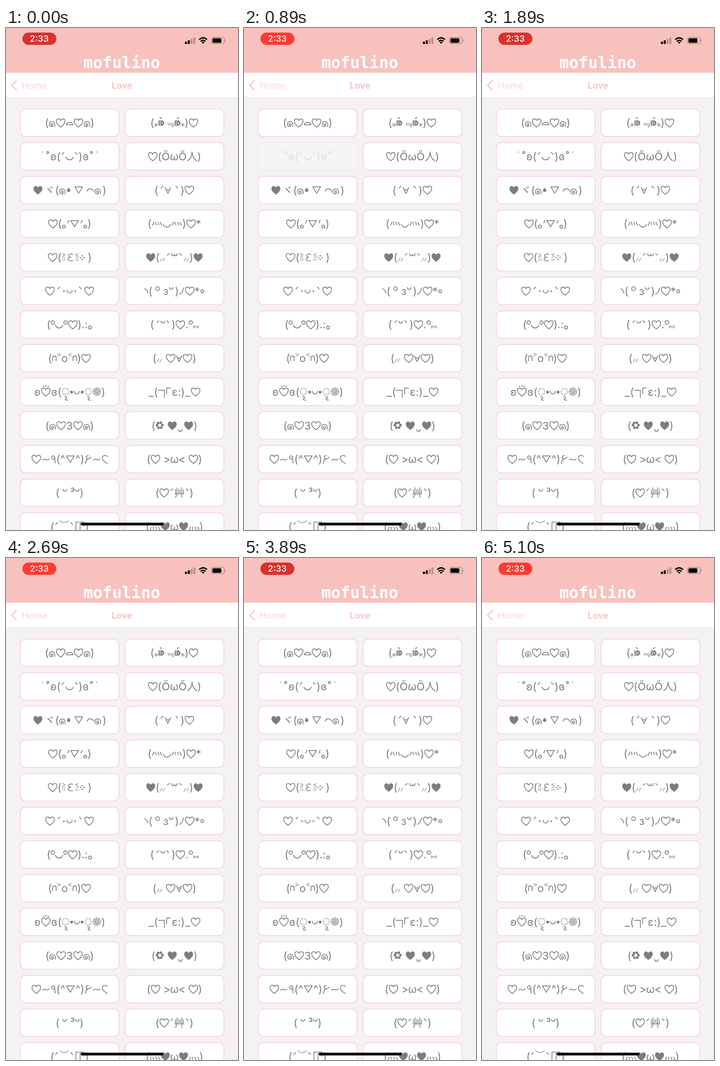
An HTML page for the animation above (5200 ms loop, 509 by 1100 pixels).

```html
<!DOCTYPE html>
<html lang="en">
<head>
<meta charset="utf-8">
<title>Love</title>
<style>
html, body { margin: 0; width: 100%; height: 100%; overflow: hidden; background: #f4f2f5; }
svg { display: block; }
text { font-family: Inter, "Open Sans", sans-serif; }
.mono { font: bold 35px "DejaVu Sans Mono", monospace; fill: #fff; }
.box { fill: #fff; stroke: #f9c4c7; stroke-width: 1.2; }
.face text { font: 23.5px Inter, "DejaVu Sans", "Noto Sans CJK JP", "Noto Sans CJK", sans-serif; fill: #7f7c80; }
.face path { fill: none; stroke: #7f7c80; stroke-width: 1.7; stroke-linecap: round; stroke-linejoin: round; }
.face path.solid { fill: #7f7c80; stroke-width: .6; }
.face path.cut { fill-rule: evenodd; stroke-width: .2; }
.face path.thin { stroke-width: 1.1; }
.face path.petals { stroke-width: 5.8; stroke-dasharray: 0 6.283; }
.face path.ring { stroke-width: 2.1; stroke-dasharray: 0 3.66; }
.note { font: 24.4px "Liberation Sans", sans-serif; fill: #fdc0ca; visibility: hidden; }
.pill { animation: pulse 5.2s ease-in-out infinite; }
.tap { animation: press 5.2s linear infinite; }
.tap .face { animation: hide 5.2s step-end infinite; }
.tap .note { animation: show 5.2s step-end infinite; }
.tap, .tap .face, .tap .note { animation-delay: var(--delay); }
@keyframes pulse {
  0%, 36.4%, 38%, 75%, 76.5% { fill: #da312c; }
  13.5%, 24%, 50%, 63.5%, 91.3%, 100% { fill: #ff3b30; }
}
@keyframes press {
  0%, 9.6%, 100% { opacity: 1; }
  2.9%, 4.8% { opacity: .17; }
}
@keyframes hide {
  0%, 17.3% { visibility: visible; }
  4.8% { visibility: hidden; }
}
@keyframes show {
  0%, 17.3% { visibility: hidden; }
  4.8% { visibility: visible; }
}
</style>
</head>
<body>
<svg width="509" height="1100" viewBox="0 0 509 1100">
  <rect width="509" height="1100" fill="#f4f2f5"/>
  <rect width="509" height="98" fill="#f9c1be"/>
  <rect class="pill" x="36" y="10" width="74.500" height="27" rx="13.500"/>
  <text x="73" y="30" font-size="19" font-weight="500" fill="#fff" text-anchor="middle">2:33</text>
  <g>
    <rect x="392.500" y="30" width="4.500" height="5" rx="1"/>
    <rect x="398.700" y="27" width="4.500" height="8" rx="1"/>
    <rect x="405" y="24" width="4.500" height="11" rx="1" opacity=".25"/>
    <rect x="411" y="20.500" width="4.500" height="14.500" rx="1" opacity=".25"/>
  </g>
  <g fill="none" stroke="#000" stroke-width="3">
    <path d="M424 25.500Q432.500 17.500 441 25.500M427.200 29.500Q432.500 24.500 437.800 29.500"/>
    <path d="M429.500 31.500Q432.500 29 435.500 31.500L432.500 34.700Z" fill="#000" stroke="none"/>
  </g>
  <rect x="451" y="20.500" width="28" height="14" rx="4" fill="none" stroke="#000" stroke-opacity=".4" stroke-width="1.200"/>
  <rect x="453" y="22.500" width="19.500" height="10" rx="2.200"/>
  <path d="M480.700 25.300Q483 27.500 480.700 29.700Z" opacity=".4"/>
  <text class="mono" x="254" y="88" text-anchor="middle">mofulino</text>
  <rect y="98" width="509" height="54" fill="#fff"/>
  <rect y="152" width="509" height="1" fill="#e8e4e8"/>
  <path d="M23.500 114.500L12.500 125.500L23.500 136.500" fill="none" stroke="#fbc9c9" stroke-width="3"/>
  <text x="34" y="133" font-size="20.300" fill="#fbd6d6">Home</text>
  <text x="254.500" y="133" font-size="19.600" font-weight="600" fill="#f7c0c2" text-anchor="middle">Love</text>
  <g id="cards"></g>
  <rect x="164" y="1084" width="181.500" height="6" rx="3"/>
</svg>
<script>
const NS = "http://www.w3.org/2000/svg";
const BASE = 38.5;
const LOOP = 5200;

const dot = (x, y, r) => `M${x - r} ${y}a${r} ${r} 0 1 0 ${2 * r} 0a${r} ${r} 0 1 0 ${-2 * r} 0Z`;
const HEART = "M0 1C-4-2-9.500-6-9.500-11.500C-9.500-15-7.500-17-5-17C-2.500-17-1-15.500 0-13.500C1-15.500 2.500-17 5-17C7.500-17 9.500-15 9.500-11.500C9.500-6 4-2 0 1Z";
const EYE = "M-6-13.500H1C8-13.500 8-2.500 1-2.500H-6ZM-4-11.500H-1V-9H-4ZM-4-7H-1V-4.500H-4ZM1-10H3V-6H1Z";

// Drawn signs: advance, path relative to the baseline, optional class
const signs = {
  "♡": [22, HEART],
  "♥": [22, HEART, "solid"],
  "ö": [22, HEART + dot(-5, -20.5, .6) + dot(0, -21.5, .6) + dot(5, -20.5, .6)],
  "๑": [15.5, "M5.500 0C7.500-5 5-11 0-11C-8-11-8 0-2 0C3 0 3-6.500-.5-6.500C-3-6.500-3-2.500-.5-3"],
  "⌓": [17, "M-7.500-4C-6-11 6-11 7.500-4Z"],
  "◡": [18, "M-8-7C-5 1 5 1 8-7"],
  "◠": [17, "M-7-6C-5-13 5-13 7-6"],
  "▽": [21, "M-8.500-15.500H8.500L0-1.500Z"],
  "∀": [15, "M-6-14L0-1L6-14M-4-9H4"],
  "´": [11, "M-2-13L2-17"],
  "`": [11, "M2-13L-2-17"],
  "˙": [13, dot(0, -18, .8), "solid"],
  "˚": [10, dot(0, -17, 2.2)],
  "°": [10, dot(0, -13, 3.8)],
  "⁰": [10, dot(0, -13.5, 4.2)],
  "｡": [10, dot(0, -2, 3.2)],
  "∘": [11, dot(0, -8, 3.2)],
  "･": [11, dot(0, -8, 1.5), "solid"],
  "•": [9, dot(0, -8, 2.8), "solid"],
  "′": [8, "M2-16L-.5-10"],
  "⁎": [9, "M0-8V0M-3.500-6L3.500-2M3.500-6L-3.500-2", "thin"],
  "À": [14, EYE + "M-4-20.500L-1-20.500L1.500-17H-.5Z", "solid cut"],
  "Á": [14, EYE + "M4-20.500L1-20.500L-1.500-17H.5Z", "solid cut"],
  "﹃": [15, "M-6-7H5.500V0H3V-4H-6Z", "thin"],
  "❛": [11, dot(.5, -8, 3.4) + "M-3-8C-3-11-1-13 2-13C0-12-1-11-1-9Z", "solid"],
  "〃": [25, "M-10-5L-7-12M-4-12L-2-6M2-12L4-6M7-12L10-5"],
  "灬": [24, "M-10-1L-8-7M-4-7L-3-2M2-7L4-2M8-7L11-1"],
  "≧": [11, "M-3-17L3-14L-3-11M-3-9H3M-2-6V-1M2-6V-1", "thin"],
  "≦": [11, "M3-17L-3-14L3-11M-3-9H3M-2-6V-1M2-6V-1", "thin"],
  "Ɛ": [18, "M5-15C-5-18.500-7-9 1-8.500C-8-8-7 2 5-1.500"],
  "⁘": [12, dot(0, -12, 1.2) + dot(-4, -8, 1.2) + dot(4, -8, 1.2) + dot(0, -4, 1.2), "solid"],
  "⸝": [14, "M-5 0L-1-7M1 0L5-7", "thin"],
  "ʷ": [16, "M-6-17C-6-10.500 0-10.500 0-15.500C0-10.500 6-10.500 6-17"],
  "ᴗ": [14, "M-5.500-10C-5.500-2 5.500-2 5.500-10"],
  "ᵕ": [11, "M-4-16C-3.500-10.500 3.500-10.500 4-16"],
  "ˬ": [14, "M-4 0C-3 6 3 6 4 0"],
  "◝": [10, "M-4-13.500C0-12 3-8 3-4"],
  "ﾉ": [13, "M4-15C3-9 0-3-5-1"],
  "⋈": [12, "M-5-1V-6L5-1V-6Z", "thin"],
  "∩": [11, "M-4-3V-9C-4-15 4-15 4-9V-3"],
  "˃": [10, "M-3.500-19L3.500-16L-3.500-13", "thin"],
  "˂": [10, "M3.500-19L-3.500-16L3.500-13", "thin"],
  "◌": [18, dot(0, -9, 7), "ring"],
  "❁": [20, dot(0, -9, 8.5) + dot(0, -9, 5.5) + dot(0, -9, 2) + "M0-17V-11M0-7V-1M-8-9H-2M2-9H8M-6-15L-1.500-10.500M1.500-7.500L6-3M6-15L1.500-10.500M-1.500-7.500L-6-3", "thin"],
  "✿": [20, dot(0, -9, 6), "petals"],
  "┐": [17, "M-7-12H6V4"],
  "「": [13, "M-4-4V-17H4"],
  "～": [20, "M-7-6C-4-13 2-2 7-9"],
  "٩": [13, dot(-.5, -12, 3.5) + "M3-13C3-8 3-4 4 0"],
  "۶": [18, "M0-16C-6-16-6-9-1-9C2-9 5-11 6-13M-1-9C-4-7-6-3-6 1"],
  "૮": [14, "M6-14C5-18-5-18-5-11C-5-6 0-2 6 1"],
  "︶": [22, "M-10-21.500C-5-15.500 5-15.500 10-21.500", "thin"],
  "ʃ": [24, "M-8 4V-18H-2M1 4V-18H9V-9" + dot(5, -13, 1.5)]
};

// Advances of plain characters
const widths = {
  " ": 6.5, "\u2009": 3, "Ő": 19, "ω": 18, "人": 23, "艸": 23, "ヾ": 24,
  "ʚ": 15, "ɞ": 15, "ε": 14, "3": 15, "з": 13, "³": 10, "o": 14,
  "*": 11, ".": 7, ":": 7, "_": 13, "^": 12, ">": 15, "<": 15
};

const faces = [
  "(๑♡⌓♡๑)", "(⁎À ﹃Á⁎)♡",
  "˙˚ʚ(´◡`)ɞ˚˙", "♡(ŐωŐ人)",
  "♥\u2009ヾ(๑❛ ▽ ◠๑\u2009)", "(\u2009´∀ `\u2009)♡",
  "♡(｡′▽′｡)", "(〃◡〃)♡*",
  "♡(≧Ɛ≦⁘ )", "♥(⸝´ʷ`⸝)♥",
  "♡\u2009´･ᴗ･`\u2009♡", "◝( ⁰ зᵕ\u2009)ﾉ♡*∘",
  "(°◡°♡).:｡", "(\u2009´ᵕ`\u2009)♡.°⋈",
  "(∩˃o˂∩)♡", "(⸝ ♡∀♡)",
  "ʚöɞ(◌•ᴗ•◌❁)", "_(┐「ε:)_♡",
  "(๑♡3♡๑)", "(✿ ♥ˬ♥)",
  "♡～٩(^▽^)۶～૮", "(♡ >ω< ♡)",
  "( ᵕ ³ᵕ)", "(♡´艸`)",
  "(´︶`ʃ)", "(灬♥ω♥灬)"
];

// Card index and the moment it is pressed, in ms
const taps = new Map([[2, 720], [3, 2720], [8, 4030]]);

function add(parent, name, attrs, label) {
  const el = document.createElementNS(NS, name);
  for (const key in attrs) el.setAttribute(key, attrs[key]);
  if (label) el.textContent = label;
  parent.appendChild(el);
  return el;
}

const advance = c => signs[c] ? signs[c][0] : widths[c] || 8;

function drawFace(card, face) {
  const group = add(card, "g", { class: "face" });
  const chars = [...face];
  let x = 108.5 - chars.reduce((sum, c) => sum + advance(c), 0) / 2;
  for (const c of chars) {
    const mid = x + advance(c) / 2;
    if (signs[c]) {
      const [, d, kind = ""] = signs[c];
      add(group, "path", { d, class: kind, transform: `translate(${mid} ${BASE})` });
      if (c === "◌") {
        add(group, "path", { d: "M-2 2C4 1.500 4 5.500 1 6S0 10.500 5 9.500", transform: `translate(${mid} ${BASE})` });
      }
    } else if (c.trim()) {
      add(group, "text", { x: mid, y: BASE, "text-anchor": "middle" }, c);
    }
    x += advance(c);
  }
}

const cards = document.getElementById("cards");
faces.forEach((face, i) => {
  const left = i % 2 ? 261 : 31;
  const top = 177.7 + 73.7 * Math.floor(i / 2);
  const card = add(cards, "g", { transform: `translate(${left} ${top})` });
  add(card, "rect", { class: "box", x: .5, y: 0, width: 216.5, height: 60, rx: 11 });
  drawFace(card, face);
  if (taps.has(i)) {
    card.setAttribute("class", "tap");
    card.style.setProperty("--delay", `${taps.get(i) - LOOP}ms`);
    add(card, "text", { class: "note", x: 108.5, y: BASE, "text-anchor": "middle" }, "Copied!");
  }
});
</script>
</body>
</html>
```
